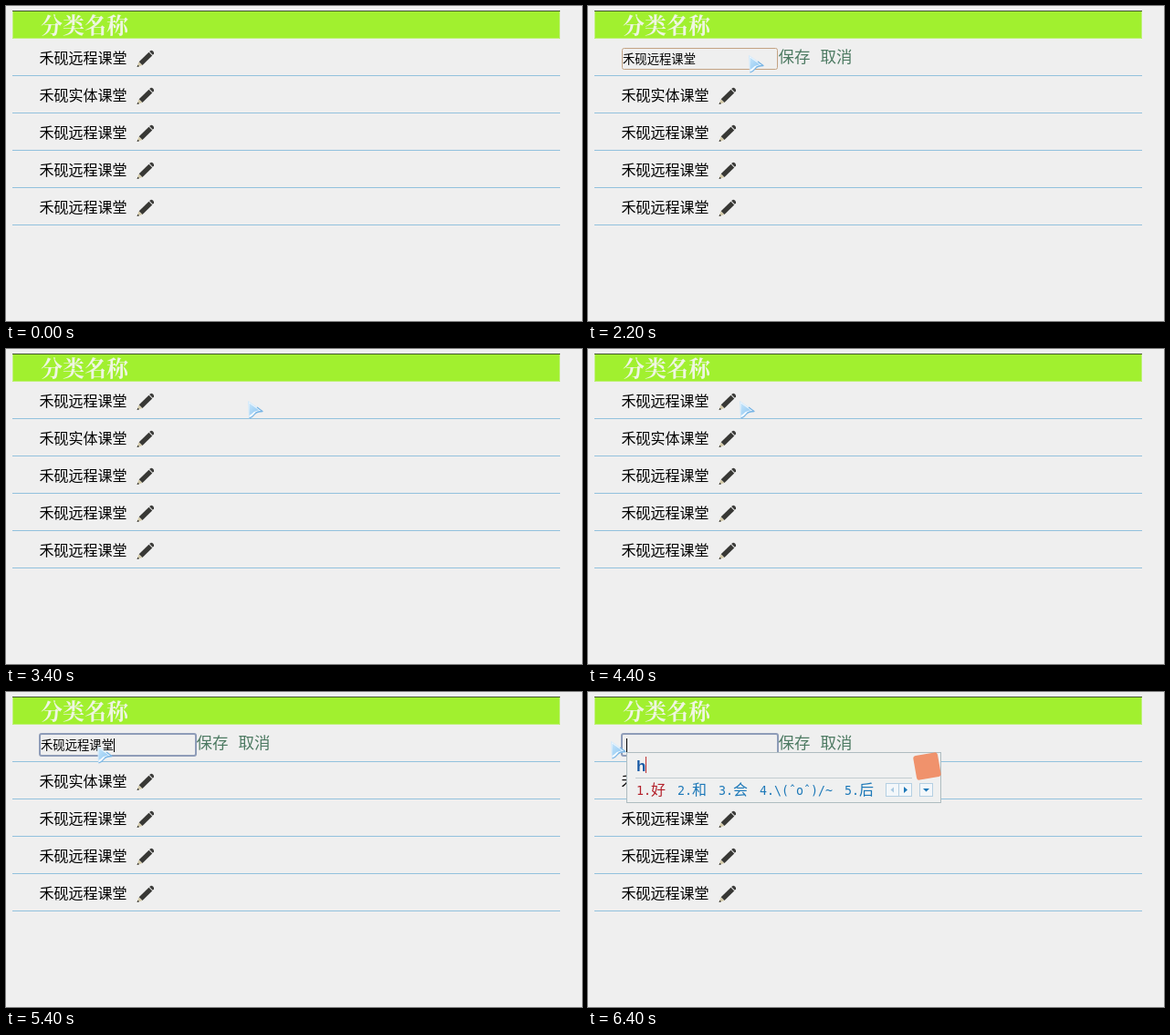
An HTML page for the animation above (8 s loop, 631 px wide and 346 px high).

```html
<!DOCTYPE html>
<html lang="zh-CN">
<head>
<meta charset="utf-8">
<title>分类名称</title>
<style>
  html, body { margin: 0; width: 100%; height: 100%; overflow: hidden; background: #efefef; }
  svg { display: block; width: 631px; height: 346px; font: 16px "Noto Sans CJK SC", "Noto Sans CJK", sans-serif; }
  .title { font: 700 24px "Noto Serif CJK SC", "Noto Sans CJK SC", "Noto Sans CJK", serif; fill: #eff5e2; }
  .field { font-size: 13.333px; }
  .link { font-size: 17.5px; font-weight: 300; fill: #4d7a62; }
  .rule { fill: #92c1dd; }
  .num { font: 13.3px "DejaVu Sans Mono", monospace; }
  .typed { font: bold 17px "Liberation Sans", sans-serif; fill: #1b5ca6; }

  /* visibility switches: hard cuts in an 8 s loop */
  .form, .idle, .focus, .endCaret, .value, .ime { animation: form 8s step-end infinite; }
  .idle { animation-name: idle; }
  .focus { animation-name: focus; }
  .endCaret { animation-name: endCaret; }
  .value { animation-name: value; }
  .ime { animation-name: ime; }
  @keyframes form { 0%, 41.25% { opacity: 0 } 15%, 58.75%, 100% { opacity: 1 } }
  @keyframes idle { 0% { opacity: 1 } 65%, 100% { opacity: 0 } }
  @keyframes focus { 0% { opacity: 0 } 65%, 100% { opacity: 1 } }
  @keyframes endCaret { 0%, 72.5%, 100% { opacity: 0 } 65% { opacity: 1 } }
  @keyframes value { 0% { opacity: 1 } 80%, 100% { opacity: 0 } }
  @keyframes ime { 0% { opacity: 0 } 80%, 100% { opacity: 1 } }

  /* selection grows leftwards from the end of the text */
  .selection { animation: select 8s step-end infinite; }
  @keyframes select {
    0% { clip-path: inset(0 0 0 100%) }
    71.25% { clip-path: inset(0 0 0 100%); animation-timing-function: steps(4) }
    76.25%, 100% { clip-path: inset(0 0 0 0%) }
  }

  /* pointer moves on a 100 ms grid */
  .pointer { animation: move 8s step-end infinite; }
  @keyframes move {
    0% { transform: translate(505px, 229px); opacity: 0 }
    1.25% { transform: translate(505px, 229px); opacity: 1 }
    3.75% { transform: translate(505px, 229px); animation-timing-function: steps(2) }
    6.25% { transform: translate(460px, 202px); animation-timing-function: steps(2) }
    8.75% { transform: translate(265px, 98px); animation-timing-function: steps(2) }
    11.25% { transform: translate(165px, 51px) }
    12.5% { transform: translate(155px, 43px) }
    13.75% { transform: translate(151px, 53px) }
    27.5% { transform: translate(175px, 53px) }
    28.75% { transform: translate(175px, 53px); animation-timing-function: steps(3) }
    32.5% { transform: translate(226px, 56px) }
    33.75% { transform: translate(226px, 56px); animation-timing-function: steps(4) }
    38.75% { transform: translate(270px, 55px); animation-timing-function: steps(3) }
    42.5% { transform: translate(264px, 56px) }
    48.75% { transform: translate(264px, 56px); animation-timing-function: steps(5) }
    55% { transform: translate(165px, 56px); animation-timing-function: steps(2) }
    57.5% { transform: translate(153px, 57px) }
    62.5% { transform: translate(129px, 59px) }
    63.75% { transform: translate(129px, 59px); animation-timing-function: steps(3) }
    67.5% { transform: translate(99px, 58px) }
    71.25% { transform: translate(99px, 58px); animation-timing-function: steps(4) }
    76.25% { transform: translate(31px, 57px) }
    78.75%, 100% { transform: translate(24px, 53px); opacity: 1 }
  }
</style>
</head>
<body>
<svg viewBox="0 0 631 346">
  <defs>
    <linearGradient id="ice" x1="0" y1="0" x2="1" y2="1">
      <stop offset="0" stop-color="#c4e4fa"/>
      <stop offset="1" stop-color="#8cc6f2"/>
    </linearGradient>
    <g id="tools">
      <path d="M143.500 67 145.500 61.500 149.500 65Z" fill="#d3c9a8"/>
      <path d="M143.500 67 144.400 64.700 146 66.200Z" fill="#222"/>
      <path d="M145.700 61.300 156.500 50.700 160.200 54.400 149.500 65Z" fill="#383835"/>
      <path d="M157.100 50.100 158.500 48.900Q160 48.600 161.200 49.800T162 52.500L160.800 53.800Z" fill="#3d3d3b"/>
      <rect class="rule" x="7" y="76" width="600" height="1"/>
    </g>
  </defs>

  <rect width="631" height="346" fill="#efefef"/>
  <rect x="7" y="5" width="600" height="31" fill="#a1f02f"/>
  <path d="M7.500 6V35.500H606.500V6" fill="none" stroke="#c0f07c"/>
  <rect x="7" y="5" width="600" height="1" fill="#42552c"/>
  <text class="title" x="38" y="29.500">分类名称</text>

  <text x="36.500" y="62.500">禾砚远程课堂</text>
  <text x="36.500" y="103.500">禾砚实体课堂</text>
  <text x="36.500" y="144.500">禾砚远程课堂</text>
  <text x="36.500" y="185.500">禾砚远程课堂</text>
  <text x="36.500" y="226.500">禾砚远程课堂</text>
  <use href="#tools"/>
  <use href="#tools" y="41"/>
  <use href="#tools" y="82"/>
  <use href="#tools" y="123"/>
  <use href="#tools" y="164"/>

  <g class="form">
    <rect x="36" y="45" width="254" height="27" fill="#efefef"/>
    <rect class="idle" x="37.500" y="46.500" width="170" height="23" rx="2" fill="none" stroke="#c3a283"/>
    <rect class="focus" x="37" y="46" width="171" height="24" rx="2" fill="none" stroke="#8e9cb8" stroke-width="2"/>
    <g class="value">
      <text class="field" x="38" y="63">禾砚远程课堂</text>
      <g class="selection">
        <rect x="38" y="51" width="80" height="16" fill="#3399ff"/>
        <text class="field" x="38" y="63" fill="#fff">禾砚远程课堂</text>
      </g>
    </g>
    <rect class="endCaret" x="118" y="51" width="1" height="15"/>
    <text class="link" x="208.500" y="62">保存</text>
    <text class="link" x="254.500" y="62">取消</text>
  </g>

  <g class="ime">
    <rect x="42" y="51" width="1" height="15"/>
    <rect x="42.500" y="66.500" width="344" height="55" fill="#eff0f0" stroke="#aebcc0"/>
    <text class="typed" x="53" y="87">h</text>
    <rect x="63" y="71" width="1" height="18" fill="#c03030"/>
    <rect x="52" y="94" width="303" height="1" fill="#c3ccd0"/>
    <g fill="#1c78b8">
      <text x="53" y="113" fill="#b3202a"><tspan class="num">1.</tspan>好</text>
      <text x="98" y="113"><tspan class="num">2.</tspan>和</text>
      <text x="143" y="113"><tspan class="num">3.</tspan>会</text>
      <text class="num" x="188" y="113">4.\(ˆoˆ)/~</text>
      <text x="281" y="113"><tspan class="num">5.</tspan>后</text>
    </g>
    <g fill="#f3f7fa" stroke="#b4cfe2">
      <rect x="326.500" y="100.500" width="14" height="14"/>
      <rect x="340.500" y="100.500" width="14" height="14"/>
      <rect x="363.500" y="100.500" width="14" height="14"/>
    </g>
    <path d="M335 104.500V110.500L331.500 107.500Z" fill="#a9c9e2"/>
    <path d="M346 104V111L350 107.500ZM367 106H374L370.500 109.500Z" fill="#1c78b8"/>
    <rect x="358" y="68" width="27" height="27" rx="3" fill="#f0926c" transform="rotate(-10 371.500 81.500)"/>
  </g>

  <!-- pale rim, blue lower edge, white band, blue core -->
  <g class="pointer" stroke-linejoin="round">
    <path d="M1.500 1.500 17 12.500Q11 13 8.500 15.500T2.500 20Z" fill="#f4faff" stroke="#d3e9f9"/>
    <path d="M2.500 20Q6.500 18.500 8.500 15.500T17 12.500L11 8" fill="none" stroke="#79b5e4" stroke-width="1.300"/>
    <path d="M2.500 3.500 13.500 11.500Q8.500 12 6.500 14T2.500 17Z" fill="url(#ice)"/>
  </g>
</svg>
</body>
</html>
```
